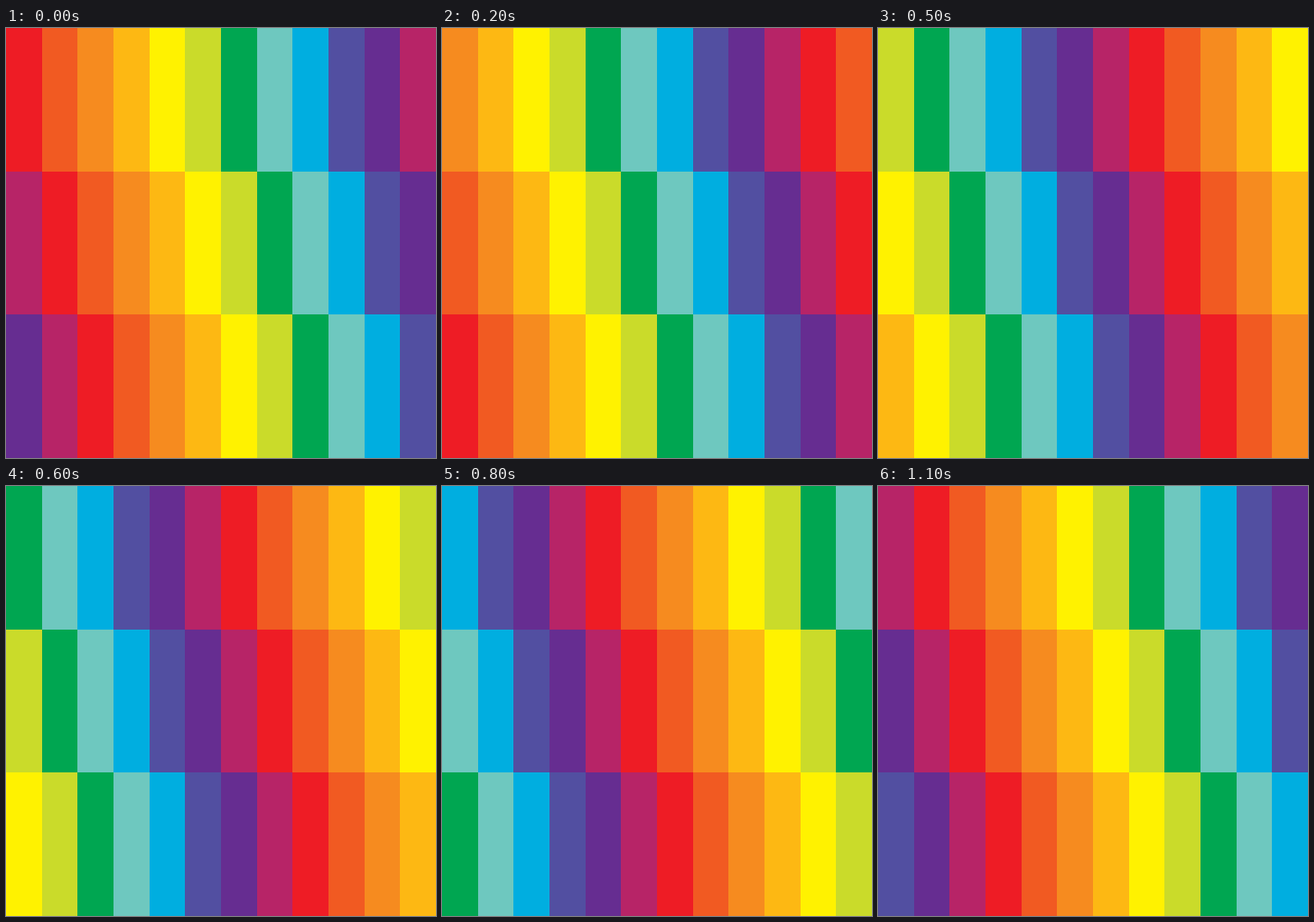
Recreate the animation shown at these times as an HTML page with a canvas. Size 500 px wide and 500 px high, loop 1200 ms.

```html
<!DOCTYPE html>
<html lang="en">
<head>
<meta charset="utf-8">
<title>Shifting rainbow</title>
<style>
  html, body { margin: 0; width: 100%; height: 100%; overflow: hidden; }
  canvas { display: block; }
</style>
</head>
<body>
<canvas width="500" height="500"></canvas>
<script>
const SIZE = 500, ROWS = 3, STEP_MS = 100;
const colors = [
  '#ee1c25', '#f15a22', '#f68b1f', '#fdb813', '#fff200', '#cadb2a',
  '#00a651', '#6ec8bf', '#00aee0', '#524fa1', '#662d91', '#b72467'
];
const count = colors.length;
const ctx = document.querySelector('canvas').getContext('2d');
const edge = (i, n) => Math.round(i * SIZE / n);

// Each row trails the one above by one stripe; all move left one stripe per step.
function draw(step) {
  for (let row = 0; row < ROWS; row++) {
    const y = edge(row, ROWS), h = edge(row + 1, ROWS) - y;
    for (let col = 0; col < count; col++) {
      const x = edge(col, count);
      ctx.fillStyle = colors[(col - row + step + count) % count];
      ctx.fillRect(x, y, edge(col + 1, count) - x, h);
    }
  }
}

const start = performance.now();
function tick() {
  draw(Math.floor((performance.now() - start) / STEP_MS) % count);
  requestAnimationFrame(tick);
}
tick();
</script>
</body>
</html>
```
